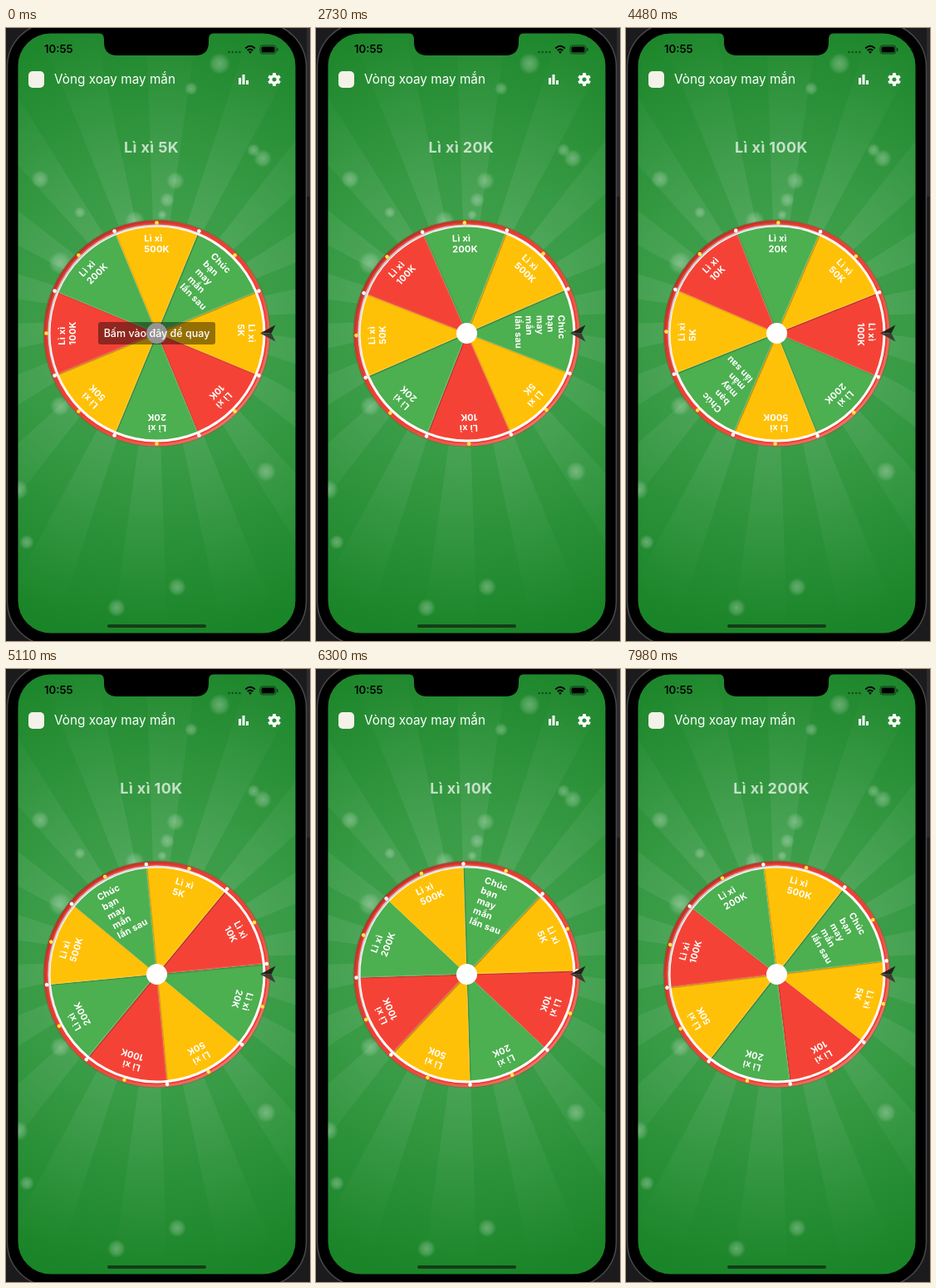
These frames come from a looping animation (366 by 738 pixels, 8000 ms). An HTML page:

```html
<!DOCTYPE html>
<html lang="vi">
<head>
<meta charset="utf-8">
<style>
  html, body { margin: 0; width: 100%; height: 100%; overflow: hidden; background: #1b1b1d; }
  svg { display: block; width: 366px; height: 738px; font-family: Inter, Roboto, sans-serif; }
</style>
</head>
<body>
<svg viewBox="0 0 366 738">
  <defs>
    <radialGradient id="felt" gradientUnits="userSpaceOnUse" cx="181" cy="350" r="390">
      <stop offset="0" stop-color="#4aa656"/>
      <stop offset=".45" stop-color="#379a44"/>
      <stop offset="1" stop-color="#1a8428"/>
    </radialGradient>
    <radialGradient id="beam" gradientUnits="userSpaceOnUse" cx="181" cy="350" r="370">
      <stop offset=".3" stop-color="#fff" stop-opacity=".09"/>
      <stop offset="1" stop-color="#fff" stop-opacity="0"/>
    </radialGradient>
    <radialGradient id="glow">
      <stop offset="0" stop-color="#fff" stop-opacity=".3"/>
      <stop offset=".6" stop-color="#fff" stop-opacity=".17"/>
      <stop offset="1" stop-color="#fff" stop-opacity="0"/>
    </radialGradient>
    <linearGradient id="bevel" x1=".1" y1=".1" x2=".9" y2=".9">
      <stop offset="0" stop-color="#000" stop-opacity=".25"/>
      <stop offset=".45" stop-color="#000" stop-opacity="0"/>
      <stop offset=".55" stop-color="#fff" stop-opacity="0"/>
      <stop offset="1" stop-color="#fff" stop-opacity=".28"/>
    </linearGradient>
    <clipPath id="screen"><rect x="14.5" y="6.5" width="334" height="722" rx="39"/></clipPath>
  </defs>

  <rect width="366" height="738" fill="#1b1b1d"/>
  <rect x="362" width="4" height="203" fill="#2b2c30"/>
  <rect x="1.5" y="-6" width="360" height="749" rx="53" fill="#000" stroke="#48484a" stroke-width="1.5"/>

  <g clip-path="url(#screen)">
    <rect x="14" y="6" width="335" height="723" fill="url(#felt)"/>
    <g id="beams" fill="url(#beam)"></g>
    <g id="bokeh" fill="url(#glow)"></g>
  </g>
  <path d="M112 6Q118 7 118 13V17Q118 33 134 33H228Q244 33 244 17V13Q244 7 250 6Z" fill="#000"/>

  <text x="46" y="30" font-size="13.2" font-weight="600">10:55</text>
  <g fill="#0f4d18">
    <circle cx="268.5" cy="29" r="1.2"/><circle cx="272.8" cy="29" r="1.2"/>
    <circle cx="277.1" cy="29" r="1.2"/><circle cx="281.4" cy="29" r="1.2"/>
  </g>
  <path d="M288.3 24.4Q294 19.2 299.7 24.4M290.7 27Q294 24.2 297.3 27" fill="none" stroke="#000" stroke-width="2"/>
  <path d="M292 28.7Q294 27.2 296 28.7L294 31Z"/>
  <rect x="306" y="21" width="19" height="10" rx="3" fill="none" stroke="#0c3d14"/>
  <rect x="307.5" y="22.5" width="16" height="7" rx="1.5"/>
  <rect x="326" y="24" width="1.5" height="4" rx=".7" fill="#0c3d14"/>

  <rect x="27" y="52" width="19" height="20" rx="5" fill="#f4f1e8"/>
  <text x="58" y="67" font-size="15.3" fill="#fff">Vòng xoay may mắn</text>
  <path d="M280 60h3v8h-3zM284.5 56h3v12h-3zM289 63h3v5h-3z" fill="#fff"/>
  <g id="gear" transform="translate(323 62)" stroke="#fff" fill="none">
    <circle r="4.3" stroke-width="3.4"/>
  </g>

  <text id="result" x="175" y="150" text-anchor="middle" font-size="18" font-weight="700"
        letter-spacing=".4" fill="#fff" fill-opacity=".7"></text>

  <g transform="translate(181.5 367.5)">
    <circle r="137" fill="#0a3010" fill-opacity=".2"/>
    <circle r="136" fill="#ee4035" stroke="#b0603c" stroke-width=".8"/>
    <circle r="131" fill="#fff"/>
    <g fill="none" stroke="url(#bevel)">
      <circle r="134.5" stroke-width="3"/>
      <circle r="130" stroke-width="2"/>
    </g>
    <g id="wheel"></g>
    <circle r="12.5" fill="#fff"/>
    <g id="button">
      <rect x="-70.5" y="-13.5" width="141" height="27" rx="3" fill-opacity=".42"/>
      <text y="4.5" text-anchor="middle" font-size="12.5" font-weight="500" fill="#fff">Bấm vào đây để quay</text>
    </g>
    <path d="M124.5 0L143 -10L138 0Z" fill="#20221c"/>
    <path d="M124.5 0L143 10L138 0Z" fill="#3a3d33"/>
  </g>
  <rect x="122" y="718" width="119" height="4" rx="2" fill="#123d18"/>
</svg>
<script>
const LOOP = 8000, STEP = 70, SPIN_START = 2170;
const RED = '#f44336', AMBER = '#ffc107', GREEN = '#4caf50';

// Clockwise from the pointer
const prizes = [
  ['Lì xì|5K', AMBER], ['Lì xì|10K', RED], ['Lì xì|20K', GREEN], ['Lì xì|50K', AMBER],
  ['Lì xì|100K', RED], ['Lì xì|200K', GREEN], ['Lì xì|500K', AMBER],
  ['Chúc|bạn|may|mắn|lần sau', GREEN]
];

// [ms, wheel degrees, degrees the headline has caught up with]
const spin = [
  [2130, 0, 0], [3430, 2435, 2100], [4480, 4500.8, 4150.8],
  [5670, 6741.5, 6396.5], [6930, 9050, 8595], [7980, 10815.5, 10215.5]
];

const edges = [];
const $ = id => document.getElementById(id);

function add(parent, tag, attrs, text) {
  const el = document.createElementNS('http://www.w3.org/2000/svg', tag);
  for (const key in attrs) el.setAttribute(key, attrs[key]);
  if (text) el.textContent = text;
  return parent.appendChild(el);
}

function polar(radius, deg) {
  const a = deg * Math.PI / 180;
  return [(radius * Math.cos(a)).toFixed(2), (radius * Math.sin(a)).toFixed(2)];
}

function wedge(radius, from, to) {
  return `M0 0L${polar(radius, from)}A${radius} ${radius} 0 0 1 ${polar(radius, to)}Z`;
}

function buildBackdrop() {
  for (let a = 13; a < 360; a += 20) {
    const [x1, y1] = polar(420, a - 5), [x2, y2] = polar(420, a + 5);
    add($('beams'), 'path', { d: `M181 350l${x1} ${y1}L${181 + +x2} ${350 + +y2}Z` });
  }
  const lights = [
    [41, 182, 11], [89, 222, 7], [204, 184, 11], [194, 207, 9], [188, 225, 6], [257, 43, 13],
    [223, 73, 8], [309, 157, 11], [298, 147, 8], [65, 283, 14], [155, 232, 12], [65, 455, 12],
    [15, 556, 12], [25, 619, 9], [313, 534, 12], [206, 673, 11], [133, 698, 11]
  ];
  for (const [cx, cy, r] of lights) add($('bokeh'), 'circle', { cx, cy, r });
  for (let a = 0; a < 360; a += 60) {
    add($('gear'), 'path', { d: 'M-1.9 -6.6H1.9', 'stroke-width': 2.6, transform: `rotate(${a})` });
  }
}

function buildWheel() {
  const wheel = $('wheel');
  prizes.forEach(([, fill], i) =>
    add(wheel, 'path', { d: wedge(128, i * 45 - 22.5, i * 45 + 22.5), fill }));
  prizes.forEach(([label], i) => {
    for (const side of [-1, 1]) {
      const deg = i * 45 + side * 22.5;
      const el = add(wheel, 'path', {
        d: `M2 ${-side * .7}H128`, 'stroke-width': 1.4, transform: `rotate(${deg})`
      });
      edges.push({ el, inward: deg - side * 90 });
    }
    const turned = add(wheel, 'g', { transform: `rotate(${i * 45 + 90})` });
    const block = add(turned, 'g', {
      fill: '#fff', 'font-size': 11, 'font-weight': 700, 'letter-spacing': .2
    });
    const lines = label.split('|').map((line, n) => add(block, 'text', { y: -110.5 + n * 13 }, line));
    const width = Math.max(...lines.map(line => line.getComputedTextLength()));
    block.setAttribute('transform', `translate(${-width / 2} 0)`);
  });
  for (let i = 0; i < 16; i++) {
    const [cx, cy] = polar(133, i * 22.5);
    add(wheel, 'circle', { cx, cy, r: 2.3, fill: i % 2 ? '#fff' : '#ffeb3b' });
  }
}

// Slices look pressed in, lit from the top left of the screen
function shadeEdges(angle) {
  for (const { el, inward } of edges) {
    const facing = Math.cos((inward + angle - 45) * Math.PI / 180);
    el.setAttribute('stroke', facing > 0 ? '#000' : '#fff');
    el.setAttribute('stroke-opacity', Math.abs(facing) * (facing > 0 ? .26 : .14));
  }
}

function sample(t, column) {
  const next = Math.max(1, spin.findIndex(row => t <= row[0]));
  const a = spin[next - 1], b = spin[next];
  return a[column] + (b[column] - a[column]) * (t - a[0]) / (b[0] - a[0]);
}

function render(now) {
  const t = Math.floor((now % LOOP) / STEP) * STEP;
  const spinning = t >= SPIN_START;
  const angle = spinning ? sample(t, 1) : 0;
  const read = spinning ? sample(t, 2) : 0;
  const index = Math.round((360 - read % 360) / 45) % 8;
  $('wheel').setAttribute('transform', `rotate(${angle % 360})`);
  shadeEdges(angle);
  $('result').textContent = prizes[index][0].replaceAll('|', ' ');
  $('button').setAttribute('visibility', spinning ? 'hidden' : 'visible');
}

buildBackdrop();
buildWheel();
const start = performance.now();
function tick() {
  render(performance.now() - start);
  requestAnimationFrame(tick);
}
tick();
</script>
</body>
</html>
```
